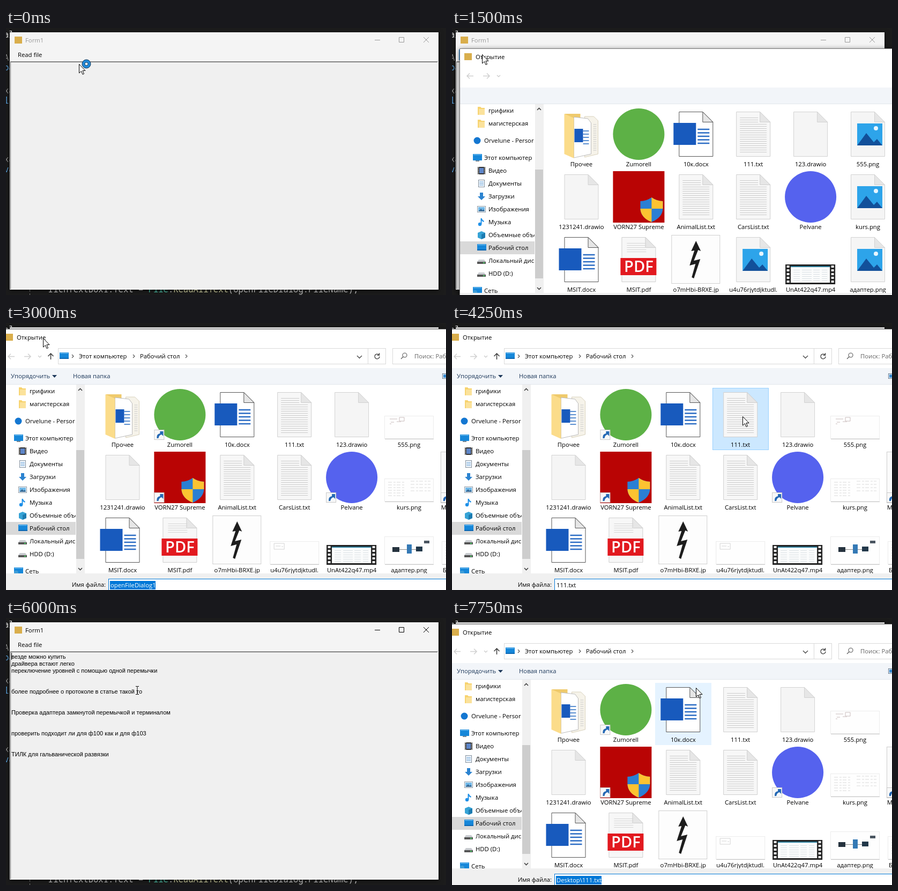
These frames come from a looping animation (821x498 px, 8 s). An HTML page:

```html
<!DOCTYPE html>
<html lang="ru">
<head>
<meta charset="utf-8">
<title>Read file</title>
<style>
  html, body { margin: 0; width: 100%; height: 100%; overflow: hidden; background: #1c1c1c; }
  svg { display: block; width: 100vw; height: 100vh; }
  text { font: 11.3px "Open Sans", "Noto Sans", sans-serif; fill: #000; white-space: pre; }
  .code text { font: 15.55px "Noto Sans Mono", "DejaVu Sans Mono", monospace; fill: #d4d4d4; }
  .memo text { font: 11px "Liberation Sans", Arial, sans-serif; }
  .mid { text-anchor: middle; }
  .line { fill: none; }
  .shade { filter: drop-shadow(0 2px 5px rgba(0, 0, 0, .55)); }
</style>
</head>
<body>
<svg id="stage" viewBox="0 0 821 498"></svg>
<script>
const rect = (x, y, w, h, fill, more = '') =>
  `<rect x="${x}" y="${y}" width="${w}" height="${h}" fill="${fill}" ${more}/>`;
const disc = (x, y, r, fill, more = '') => `<circle cx="${x}" cy="${y}" r="${r}" fill="${fill}" ${more}/>`;
const shape = (d, fill, more = '') => `<path d="${d}" fill="${fill}" ${more}/>`;
const stroke = (d, color, width = 1, more = '') =>
  `<path class="line" d="${d}" stroke="${color}" stroke-width="${width}" ${more}/>`;
const text = (x, y, s, more = '') => `<text x="${x}" y="${y}" ${more}>${s}</text>`;
const group = (body, more = '') => `<g ${more}>${body}</g>`;
const at = (x, y, body, more = '') => group(body, `transform="translate(${x} ${y})" ${more}`);
const frame = (x, y, w, h, fill, color) => rect(x + .5, y + .5, w - 1, h - 1, fill, `stroke="${color}"`);
const from = level => `data-from="${level}"`;
const until = level => `data-until="${level}"`;

/* Editor behind the windows */
const margin = [
  [18, 'al', '#f0f0f0'], [61, 'А', '#8a8a8a'], [79, 'ba', '#569cd6'], [122, 'ха', '#8a8a8a'],
  [141, 'l:', '#569cd6'], [184, ' ]', '#8a8a8a'], [250, 'ха', '#8a8a8a'], [269, 'va', '#569cd6'],
  [315, ' :', '#8a8a8a'], [335, ' -', '#8a8a8a']
];
const editor = group(
  rect(0, 0, 821, 498, '#1c1c1c') +
  margin.map(([y, s, color]) => text(-4, y, s, `style="fill:${color}"`)).join('') +
  stroke('M44.5 488v10', '#777', 1, 'stroke-dasharray="4 3"') +
  text(79, 493, 'richTextBox1.Text = <tspan fill="#4ec9b0">File</tspan>.<tspan fill="#dcdcaa">ReadAllText</tspan>(openFileDialog.FileName);'),
  'class="code"');

/* Main form */
const memoLines = [
  [0, 'везде можно купить'], [1, 'драйвера встают легко'],
  [2, 'переключение уровней с помощью одной перемычки'],
  [5, 'более подробнее о протоколе в статье такой то'],
  [8, 'Проверка адаптера замкнутой перемычкой и терминалом'],
  [11, 'проверить подходит ли для ф100 как и для ф103'],
  [14, 'ТИЛК для гальванической развязки']
];
const form = rect(7, 8, 800, 480, '#f0f0f0', 'class="shade"') +
  rect(7, 8, 800, 54, '#f4f4f4') +
  rect(16, 16, 14, 13, '#d9ae4c') +
  group(text(36, 27, 'Form1', 'style="fill:currentColor"') +
    stroke('M688 22.5h10M733.5 17.5h9v9h-9zM779 17l10 10M789 17l-10 10', 'currentColor'), 'id="caption"') +
  group(frame(13, 40, 64, 20, '#b3d7f3', '#0078d7'), 'id="menu"') +
  text(22, 54, 'Read file') +
  stroke('M8 62.5H806', '#a0a0a0') + stroke('M8 63.5H805M8.5 63V487', '#696969') +
  stroke('M806.5 62V487.5H8', '#fff') +
  group(memoLines.map(([row, s]) => text(10, 76 + row * 13, s)).join(''), 'id="memo" class="memo"') +
  group(rect(10, 65, 1, 13, '#000'), 'id="caret"');

/* File icons, centred on 0,0 */
const page = (fill, edge) =>
  shape('M-31.5-41.5h44l19 19v64h-63z', fill, `stroke="${edge}"`) +
  shape('M12.5-41.5v19h19z', '#e6e6e6', `stroke="${edge}"`);
const rows = (x, w, top, bottom, step) => {
  let d = '';
  for (let y = top; y <= bottom; y += step) d += `M${x} ${y}h${w}`;
  return d;
};
const badge = group(frame(-48, 28, 19, 19, '#f8f8f8', '#c8c8c8') +
  shape('M-43 44q-1-8 6-9v-4h6v9l-3-3q-5 1-6 7z', '#2468b4'), from(2));
const genericImage = group(page('#f5f5f5', '#d2d2d2') + rect(-20, -20, 47, 41, '#2da4ea') +
  shape('M-20 21l17-23 14 17 6-6 10 12z', '#12509a') + disc(15, -11, 4, '#e8f6ff'), until(2));
const thumb = (h, marks) => genericImage +
  group(frame(-46, 45 - h, 92, h, '#fefefe', '#ececec') + stroke('M-45 45.500h91', '#c8c8c8') + marks, from(3));

const icons = {
  blank: page('#f5f5f5', '#d2d2d2'),
  text: page('#f7f7f7', '#cfcfcf') + stroke(rows(-25, 50, -18.5, 34, 4) + rows(-25, 34, -30.5, -22, 4), '#cbcbcb'),
  doc: page('#fff', '#555') + stroke(rows(3, 22, -9, 17, 6.5), '#2b6cc4', 2.5) + rect(-42, -21, 42, 41, '#185abd'),
  pdf: page('#f7f7f7', '#cfcfcf') + stroke(rows(-22, 36, -30.5, -12, 4), '#d5d5d5') + rect(-34, -3, 67, 32, '#e2191f') +
    text(0, 23, 'PDF', 'class="mid" style="font-size:29px;font-weight:600;fill:#fff"'),
  folder: shape('M-31-38h29v72h-29z', '#efca6c') +
    shape('M6-33h17l8 8v62l-25 6z', '#f6f3ea', 'stroke="#d9d2bd"') +
    stroke(rows(22, 6, -18, 30, 4), '#c9c9c9') +
    shape('M-14-32l26 3 6 8v58l-32 7z', '#fff', 'stroke="#bbb"') +
    stroke(rows(3, 11, -6, 18, 6), '#5b8fd0', 2) + rect(-13, -10, 16, 25, '#185abd') +
    shape('M-32-38l18 8v75l-18-8z', '#fbdc8a'),
  green: disc(0, 0, 48, '#5db146') + badge,
  red: rect(-48, -48, 96, 96, '#b90404') +
    shape('M24 1q10 7 21 7v13q0 17-21 26Q3 38 3 21V8q11 0 21-7z', '#2b7fd3') +
    shape('M24 1q10 7 21 7v14H24zM24 22H3q1 17 21 25z', '#fcc331') + badge,
  violet: disc(0, 0, 48, '#5562ee') + badge,
  bolt: frame(-46, -46, 91, 91, '#fdfdfd', '#cfcfcf') +
    shape('M0-35L9-16 4-18-4 2 8-1-4 35-8 33-1 8-12 11-3-17-9-16z', '#1d1d1d'),
  sketch: thumb(43, stroke('M-36 8h14m4-3h9v7h-9zM-34 14h6m5-1h8M-36 17h3', '#c9bcbc')),
  notes: thumb(43, stroke(rows(-39, 31, 9, 36, 5) + rows(3, 37, 7, 28, 6), '#dadada', 1, 'stroke-dasharray="7 3 4 2"')),
  plan: thumb(43, stroke('M-38 6h19v11h-19zm3 5h9m2 1h3', '#d4d4d4')),
  parts: thumb(52, rect(-31, 13, 13, 9, '#25323e') + rect(-4, 8, 9, 17, '#3479b5') + rect(13, 12, 12, 9, '#22384a') +
    rect(28, 1, 10, 5, '#4a5560') + stroke('M-18 17.500h14m9 0h8', '#888')),
  movie: rect(-47, 9, 93, 37, '#222') + rect(-37, 12, 73, 31, '#fbfcfc') + rect(-37, 12, 73, 2, '#2e7e9b') +
    stroke('M-42 11v34M41 11v34', '#eee', 5, 'stroke-dasharray="4 3"') +
    stroke(rows(-32, 63, 19.5, 40, 4), '#d9dfe3', 1, 'stroke-dasharray="12 4 18 3"'),
  app: frame(-48, -48, 96, 96, '#fafafa', '#ccc') + badge
};
const files = [
  ['folder Прочее', 'green Zumorell', 'doc 10к.docx', 'text 111.txt', 'blank 123.drawio', 'sketch 555.png'],
  ['blank 1231241.drawio', 'red VORN27 Supreme', 'text AnimalList.txt', 'text CarsList.txt', 'violet Pelvane', 'notes kurs.png', 'app Mnemo notes.exe'],
  ['doc MSIT.docx', 'pdf MSIT.pdf', 'bolt o7mHbi-BRXE.jp', 'plan u4u76rjytdjktudl.', 'movie UnAt422q47.mp4', 'parts адаптер.png', 'notes Библиотека.png']
];
const list = files.map((row, r) => row.map((file, c) => {
  const [kind, ...name] = file.split(' ');
  return at(217.5 + c * 106.9, 171 + r * 117, icons[kind] + text(0, 60, name.join(' '), 'class="mid"'));
}).join('')).join('');

/* Navigation pane */
const screen = rect(0, 0, 17, 12, '#1687d9') + rect(1, 1, 15, 1, '#7cc6f5');
const small = {
  folder: shape('M1 0h5l2 2h6v13H1z', '#f7d36f') + rect(3, 4, 11, 11, '#fbe29b'),
  dot: disc(8, 7, 6.5, '#1477d1'),
  pc: screen + rect(5, 12, 7, 2, '#7d8a94'),
  film: rect(1, 0, 14, 14, '#333') + rect(4, 2, 8, 10, '#5e86c9') + stroke('M2.5 0v14M13.5 0v14', '#ddd', 1, 'stroke-dasharray="2 1"'),
  sheet: frame(2, 0, 12, 14, '#fff', '#7b8b9b') + stroke(rows(4, 8, 4, 12, 3), '#4a8fd0'),
  down: shape('M5 0h6v7h4l-7 7-7-7h4z', '#2b83d0'),
  picture: frame(0, 1, 16, 12, '#fff', '#8a98a5') + rect(2, 3, 12, 8, '#70b8e8') + shape('M2 11l5-5 3 3 2-2 2 4z', '#386a96'),
  note: disc(5, 11, 3.2, '#1e90e8') + stroke('M7.5 11V0q1 4 5 6', '#1e90e8', 2),
  cube: shape('M1 3l7-3 7 3v9l-7 3-7-3z', '#36a3d6') + shape('M8 6l7-3v9l-7 3z', '#1c7bb0'),
  desk: screen + rect(0, 10, 17, 2, '#0b67b3'),
  disk: shape('M3 5h10l3 4H0z', '#c9ccd0') + rect(0, 9, 16, 4, '#555') + rect(11, 10, 3, 2, '#4fd06a'),
  net: screen + disc(4, 10, 4, '#3f9ed8')
};
const places = [
  [127, 'folder', 'грифики', 1], [151, 'folder', 'магистерская', 1], [183, 'dot', 'Orvelune - Persor'],
  [215, 'pc', 'Этот компьютер'], [239, 'film', 'Видео', 1], [263, 'sheet', 'Документы', 1],
  [287, 'down', 'Загрузки', 1], [311, 'picture', 'Изображения', 1], [335, 'note', 'Музыка', 1],
  [359, 'cube', 'Объемные объекты', 1], [383, 'desk', 'Рабочий стол', 1], [407, 'disk', 'Локальный диск', 1],
  [431, 'disk', 'HDD (D:)', 1], [463, 'net', 'Сеть']
];
const pane = group(rect(-9, 371, 140, 24, '#d9d9d9') + places.map(([y, icon, name, child = 0]) =>
    at(15 + child * 8, y - 7, small[icon]) + text(36 + child * 8, y + 4, name)).join(''), 'clip-path="url(#paneClip)"') +
  rect(131, 115, 16, 352, '#f0f0f0') + rect(131, 237, 15, 203, '#cdcdcd') +
  stroke('M135 126l3.500-3.500 3.500 3.500M135 457l3.500 3.500 3.500-3.500', '#444', 1.6);

/* Open dialog */
const arrow = (x, dir, color) =>
  stroke(`M${x - 6 * dir} 62.500h${12 * dir}m${-5 * dir}-5l${5 * dir} 5l${-5 * dir} 5`, color, 1.5);
const navigation = stroke('M83.500 68V57m-5 5l5-5 5 5', '#444', 1.6) +
  frame(97, 47, 612, 30, '#fff', '#d9d9d9') + stroke('M675.500 48v28', '#d9d9d9') +
  at(100, 55, small.desk) + stroke([125, 239, 337].map(x => `M${x - 2} 59l3 3-3 3`).join(''), '#555', 1.2) +
  text(136, 66, 'Этот компьютер') + text(250, 66, 'Рабочий стол') +
  stroke('M655 61l4.500 4.500 4.500-4.500', '#444', 1.3) +
  stroke('M696 59.500a4.500 4.500 0 1 0 1 3M696.500 56v4h-4', '#444', 1.4) +
  frame(721, 47, 150, 30, '#fff', '#d9d9d9') +
  stroke('M741 63l-4 4M748 60a4 4 0 1 1-8 0a4 4 0 1 1 8 0', '#555', 1.1) +
  text(762, 66, 'Поиск: Рабочий стол', 'style="fill:#666"') +
  text(9, 103, 'Упорядочить', 'style="fill:#1e395b"') + shape('M86 97h9l-4.500 5z', '#1e395b') +
  text(125, 103, 'Новая папка', 'style="fill:#1e395b"') +
  frame(814, 94, 16, 10, '#fff', '#63788f') + rect(816, 96, 6, 6, '#3b8bd0');
const dialog = rect(-10, 11, 960, 640, '#777', 'class="shade"') + rect(-9, 12, 958, 638, '#fff') +
  rect(-1, 20, 14, 13, '#d9ae4c') + text(20, 31, 'Открытие') +
  arrow(10, -1, '#d0d0d0') + arrow(40, 1, '#d0d0d0') + stroke('M60 61l3 3 3-3', '#c8c8c8', 1.2) +
  rect(-9, 84, 958, 30, '#f2f5f9') + rect(-9, 114, 958, 1, '#e2e6eb') +
  group(navigation, from(2)) +
  group(pane + group(frame(0, 0, 105, 116, '#e5f3ff', '#e5f3ff'), 'id="hover"') +
    group(frame(486, 121, 105, 116, '#cce8ff', '#99d1ff'), 'id="picked"') + list, from(1)) +
  rect(-9, 467, 958, 183, '#f0f0f0') + text(186, 492, 'Имя файла:', 'text-anchor="end"') +
  frame(191, 477, 700, 24, '#fff', '#0078d7') +
  group(rect(194, 481, 85, 16, '#0078d7'), 'id="selection"') + text(195, 492.5, '', 'id="fileName"');

const pointers =
  group(shape('M.500.500v16.500l4-3.500 2.500 6 2.500-1-2.500-6h5z', '#fff', 'stroke="#000"'), 'data-pointer="arrow busy"') +
  group(disc(14, 0, 5.5, '#fff', 'stroke="#2389d8" stroke-width="5"') +
    disc(14, 0, 8, 'none', 'stroke="#123a5c"') + disc(14, 0, 3, '#fff', 'stroke="#123a5c"'), 'data-pointer="busy"') +
  group(stroke('M-3-7.500h2.500l.500.500.500-.500H3M0-7V7M-3 7.500h2.500l.500-.500.500.500H3', '#000'), 'data-pointer="beam"');

const stage = document.getElementById('stage');
stage.innerHTML = '<clipPath id="paneClip"><rect x="-9" y="115" width="139" height="352"/></clipPath>' +
  editor + form + group(dialog, 'id="dialog"') + group(pointers, 'id="pointer"');

/* Each step changes only the values it names. */
const steps = [
  { t: 0, x: 136, y: 67, pointer: 'busy', active: false, menu: false, memo: false, caret: false,
    level: -1, dx: 24, dy: 27, hover: -1, picked: false, name: 'openFileDialog1' },
  { t: 250, x: 128, y: 65 },
  { t: 500, x: 85, y: 56, pointer: 'arrow' },
  { t: 750, x: 56, y: 49, menu: true },
  { t: 1250, level: 0 },
  { t: 1500, level: 1 },
  { t: 1750, level: 2 },
  { t: 2000, level: 3, x: 75, y: 52 },
  { t: 2250, x: 93, y: 55 },
  { t: 2500, x: 87, y: 48, dx: 18, dy: 20 },
  { t: 2750, x: 75, y: 35, dx: 6, dy: 7 },
  { t: 3000, x: 69, y: 28, dx: 0, dy: 0 },
  { t: 3250, x: 210, y: 80 },
  { t: 3500, x: 430, y: 145, hover: 2 },
  { t: 3750, x: 510, y: 168, hover: 3 },
  { t: 4000, x: 542, y: 174 },
  { t: 4250, hover: -1, picked: true, name: '111.txt' },
  { t: 4750, level: -1, picked: false, pointer: '', active: true, menu: false, memo: true, caret: true },
  { t: 5250, caret: false },
  { t: 5750, caret: true, pointer: 'beam', x: 313, y: 183 },
  { t: 6000, x: 245, y: 135 },
  { t: 6250, x: 150, y: 88, caret: false },
  { t: 6500, pointer: 'arrow', x: 75, y: 50, menu: true },
  { t: 6750, x: 65, y: 46, caret: true },
  { t: 7000, active: false, caret: false },
  { t: 7250, level: 1, name: 'Desktop\\111.txt' },
  { t: 7500, level: 3, x: 270, y: 88 },
  { t: 7750, x: 455, y: 130, hover: 2 }
];
const states = [];
steps.forEach((step, i) => states.push({ ...states[i - 1], ...step }));

const byId = id => document.getElementById(id);
const show = (node, on) => { node.style.display = on ? '' : 'none'; };
const move = (node, x, y) => node.setAttribute('transform', `translate(${x} ${y})`);
const staged = [...stage.querySelectorAll('[data-from], [data-until]')];
const cursors = [...stage.querySelectorAll('[data-pointer]')];

function render(s) {
  byId('caption').style.color = s.active ? '#000' : '#999';
  for (const id of ['menu', 'memo', 'caret', 'picked']) show(byId(id), s[id]);
  show(byId('dialog'), s.level >= 0);
  move(byId('dialog'), s.dx, s.dy);
  for (const node of staged) {
    const { from = 0, until = 9 } = node.dataset;
    show(node, s.level >= from && s.level <= until);
  }
  show(byId('hover'), s.hover >= 0);
  move(byId('hover'), 165 + s.hover * 107, 121);
  byId('fileName').textContent = s.name;
  byId('fileName').style.fill = s.picked ? '#000' : '#fff';
  show(byId('selection'), !s.picked);
  move(byId('pointer'), s.x, s.y);
  for (const node of cursors) show(node, s.pointer && node.dataset.pointer.includes(s.pointer));
}

const start = performance.now();
let current;
function tick() {
  const time = (performance.now() - start) % 8000;
  const state = states.findLast(s => s.t <= time);
  if (state !== current) render(current = state);
  requestAnimationFrame(tick);
}
tick();
</script>
</body>
</html>
```
